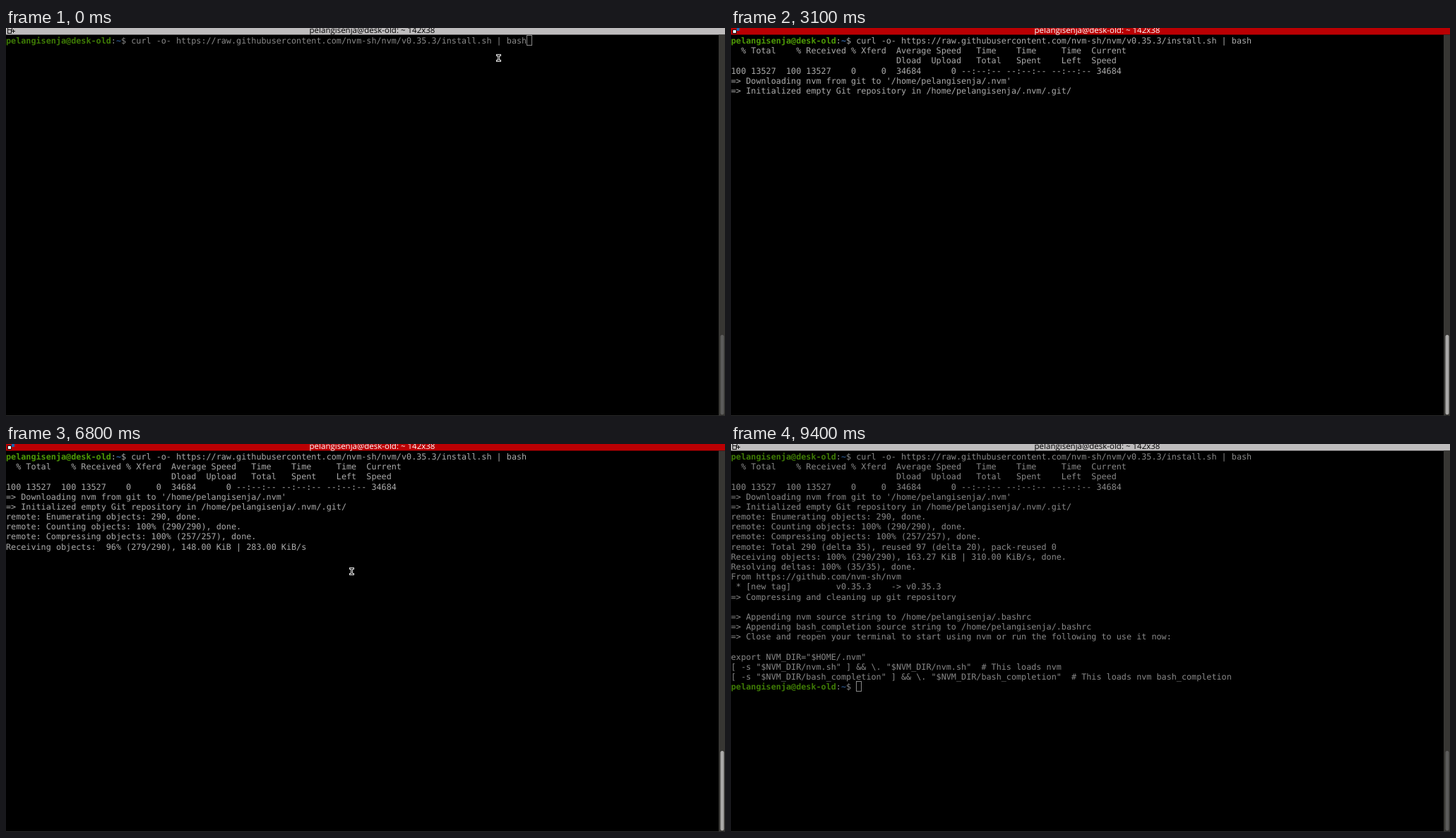
An HTML page with a canvas that plays this animation: 1018 px wide and 550 px high, repeating every 9.5 s.

```html
<!DOCTYPE html>
<html lang="en">
<head>
<meta charset="utf-8">
<title>Terminal</title>
<style>
  html, body { margin: 0; width: 100%; height: 100%; overflow: hidden; background: #000; }
  canvas { display: block; }
</style>
</head>
<body>
<canvas id="stage" width="1018" height="550"></canvas>
<script>
const ctx = document.getElementById('stage').getContext('2d');
const LOOP = 9500, TICK = 100, BLINK = 600;
const FOCUS_IN = 1000, ENTER = 2500, FOCUS_OUT = 9400;
const CELL_W = 7.088, CELL_H = 14.18, TOP = 10.5;
const MONO = '11.78px "DejaVu Sans Mono", monospace';

const USER = 'pelangisenja', HOST = 'desk-old';
const ID = `${USER}@${HOST}`, HOME = `/home/${USER}`;
const PROMPT = `${ID}:~$ `;
const COMMAND = PROMPT + 'curl -o- https://raw.githubusercontent.com/nvm-sh/nvm/v0.35.3/install.sh | bash';

const ACTIVE = { bar: '#ba0003', title: '#fff', text: '#aaa', user: '#4e9a06', path: '#3465a4' };
const IDLE = { bar: '#bebcbd', title: '#000', text: '#888', user: '#3e7b05', path: '#2a5183' };

const progress = (verb, done, total) =>
  `${verb} objects: ${String(Math.floor(100 * done / total)).padStart(3)}% (${done}/${total})`;

// Each write replaces the row the caret is on and may add rows below it.
const writes = [
  { at: 0, lines: [COMMAND] },
  { at: ENTER + TICK, lines: [
    COMMAND,
    '  % Total    % Received % Xferd  Average Speed   Time    Time     Time  Current',
    '                                 Dload  Upload   Total   Spent    Left  Speed',
    '  0     0    0     0    0     0      0      0 --:--:-- --:--:-- --:--:--     0'] },
  { at: 3100, lines: [
    '100 13527  100 13527    0     0  34684      0 --:--:-- --:--:-- --:--:-- 34684',
    `=> Downloading nvm from git to '${HOME}/.nvm'`,
    `=> Initialized empty Git repository in ${HOME}/.nvm/.git/`,
    ''] },
  { at: 6200, lines: ['remote: Enumerating objects: 290, done.', progress('remote: Counting', 122, 290)] },
  { at: 6300, lines: [progress('remote: Counting', 290, 290) + ', done.', progress('remote: Compressing', 54, 257)] },
  { at: 6400, lines: [progress('remote: Compressing', 175, 257)] },
  { at: 6500, lines: [progress('remote: Compressing', 257, 257) + ', done.', ''] },
  { at: 6700, lines: [progress('Receiving', 122, 290)] },
  { at: 6800, lines: [progress('Receiving', 279, 290) + ', 148.00 KiB | 283.00 KiB/s'] },
  { at: 6900, lines: [
    'remote: Total 290 (delta 35), reused 97 (delta 20), pack-reused 0',
    progress('Receiving', 290, 290) + ', 163.27 KiB | 310.00 KiB/s, done.',
    'Resolving deltas: 100% (35/35), done.',
    'From https://github.com/nvm-sh/nvm',
    ' * [new tag]         v0.35.3    -> v0.35.3',
    '=> Compressing and cleaning up git repository',
    ''] },
  { at: 7000, lines: [
    '',
    `=> Appending nvm source string to ${HOME}/.bashrc`,
    `=> Appending bash_completion source string to ${HOME}/.bashrc`,
    '=> Close and reopen your terminal to start using nvm or run the following to use it now:',
    '',
    'export NVM_DIR="$HOME/.nvm"',
    '[ -s "$NVM_DIR/nvm.sh" ] && \\. "$NVM_DIR/nvm.sh"  # This loads nvm',
    '[ -s "$NVM_DIR/bash_completion" ] && \\. "$NVM_DIR/bash_completion"  # This loads nvm bash_completion',
    PROMPT] }
];

// Pointer moves along Bezier curves; the last one leaves through the top edge.
const POINTER_BACK = 4300;
const moves = [
  { from: 4400, to: 5600, curve: [[697, 42], [852, 14], [745, 96], [489, 180]] },
  { from: 7200, to: 7800, curve: [[489, 180], [499, 168]] },
  { from: 7800, to: 8500, curve: [[499, 168], [420, 110], [9, -10]] }
];

function rect(color, x, y, w, h) {
  ctx.fillStyle = color;
  ctx.fillRect(x, y, w, h);
}

function outline(color, x, y, w, h) {
  ctx.strokeStyle = color;
  ctx.lineWidth = 1;
  ctx.strokeRect(x + .5, y + .5, w - 1, h - 1);
}

function drawLine(text, row, theme) {
  const hasPrompt = text.startsWith(PROMPT);
  [...text].forEach((char, col) => {
    const isUser = hasPrompt && col < ID.length;
    const isPath = hasPrompt && col === ID.length + 1;
    ctx.font = (isUser || isPath ? 'bold ' : '') + MONO;
    ctx.fillStyle = isUser ? theme.user : isPath ? theme.path : theme.text;
    ctx.fillText(char, col * CELL_W, TOP + row * CELL_H + 11.5);
  });
}

function screenRows(t) {
  const rows = [''];
  for (const { at, lines } of writes) {
    if (at <= t) rows.splice(-1, 1, ...lines);
  }
  return rows;
}

function drawCaret(t, rows, focused, theme) {
  const row = rows.length - 1;
  const x = rows[row].length * CELL_W, y = Math.round(TOP - .3 + row * CELL_H);
  const blinkStart = t < ENTER ? FOCUS_IN : ENTER;
  if (!focused) outline(theme.text, Math.round(x), y, 8, 15);
  else if (Math.floor((t - blinkStart) / BLINK) % 2 === 0) rect(theme.text, x + .4, y, 7, 14.5);
}

function drawTitleBar(focused, theme) {
  rect(theme.bar, 0, 0, 1018, 9.5);
  ctx.font = '11.5px "Open Sans", sans-serif';
  ctx.textAlign = 'center';
  ctx.fillStyle = theme.title;
  ctx.fillText(`${ID}: ~ 142x38`, 518.5, 7);
  ctx.textAlign = 'left';
  if (focused) {
    rect('#1c1c1c', 2, 2, 6, 6);
    rect('#fff', 3, 3, 4, 4);
    rect('#1b66b0', 8, 0, 4, 4);
  } else {
    outline('#111', 2, -3, 7, 6);
    outline('#111', 2, 2, 6, 6);
    rect('#111', 8, 4, 5, 1);
    rect('#111', 10, 2, 1, 5);
  }
}

function drawScrollbar(t, focused) {
  rect('#373633', 1009, 9.5, 9, 540.5);
  ctx.fillStyle = !focused ? '#5c5c5b' : t < FOCUS_IN + TICK ? '#858584' : '#aaa9a8';
  ctx.beginPath();
  ctx.roundRect(1011.5, 435, 5, 113, 2.5);
  ctx.fill();
  rect('#2b2b2b', 0, 549, 1018, 1);
}

function bezier(points, u) {
  if (points.length === 1) return points[0];
  const inner = points.slice(1).map(([x, y], i) => {
    const [px, py] = points[i];
    return [px + (x - px) * u, py + (y - py) * u];
  });
  return bezier(inner, u);
}

function drawPointer(t) {
  if (t >= ENTER && t < POINTER_BACK) return;
  const { from, to, curve } = moves.filter(move => move.from <= t).pop() || moves[0];
  const part = Math.min(1, Math.max(0, (t - from) / (to - from)));
  const [px, py] = bezier(curve, Math.sin(part * Math.PI / 2));
  const x = Math.round(px) + .5, y = Math.round(py) + .5;
  const beam = new Path2D(`M${x - 2} ${y - 4}h4M${x} ${y - 4}v8M${x - 2} ${y + 4}h4`);
  ctx.lineCap = 'square';
  for (const [color, width] of [['#ddd', 3], ['#222', 1]]) {
    ctx.strokeStyle = color;
    ctx.lineWidth = width;
    ctx.stroke(beam);
  }
}

function draw(now) {
  const t = Math.floor(now % LOOP / TICK) * TICK;
  const focused = t >= FOCUS_IN && t < FOCUS_OUT;
  const theme = focused ? ACTIVE : IDLE;
  const rows = screenRows(t);
  rect('#000', 0, 0, 1018, 550);
  ctx.textRendering = 'geometricPrecision';
  rows.forEach((line, row) => drawLine(line, row, theme));
  drawCaret(t, rows, focused, theme);
  drawTitleBar(focused, theme);
  drawScrollbar(t, focused);
  drawPointer(t);
}

const start = performance.now();
function loop() {
  draw(performance.now() - start);
  requestAnimationFrame(loop);
}
loop();
</script>
</body>
</html>
```
